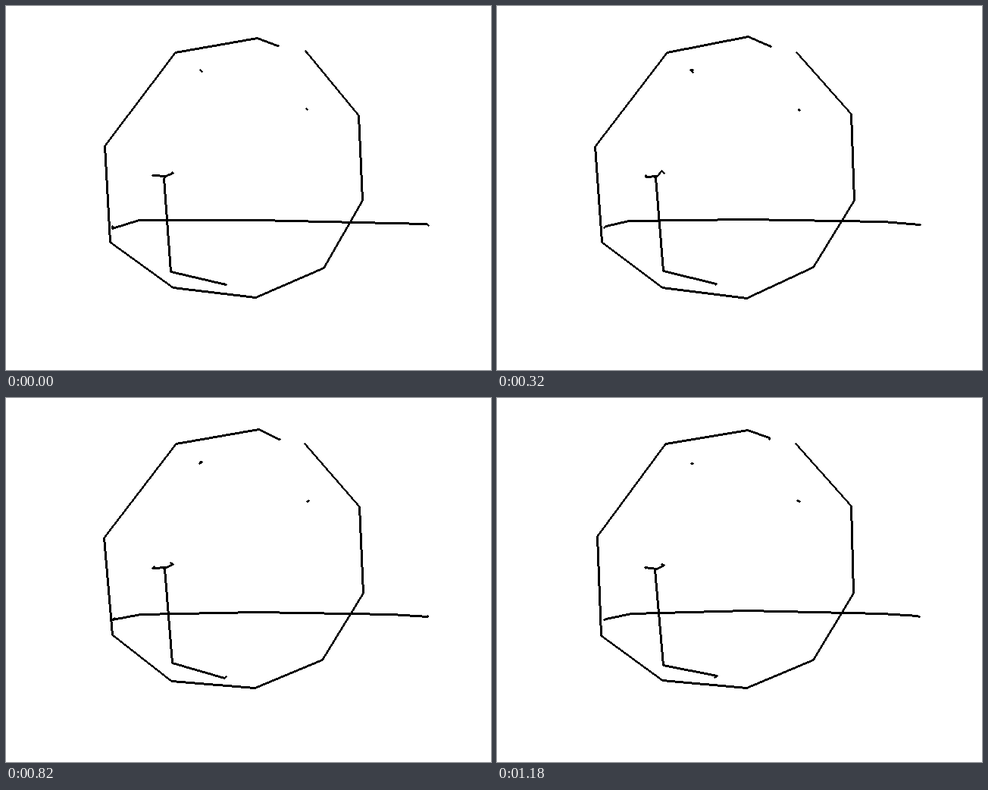
These frames come from a looping animation (640 by 480 pixels, 1200 ms). An HTML page with a canvas:

```html
<!DOCTYPE html>
<html lang="en">
<head>
<meta charset="utf-8">
<title>Wobbly face</title>
<style>
  html, body { margin: 0; width: 100%; height: 100%; overflow: hidden; background: #fff; }
  canvas { display: block; }
</style>
</head>
<body>
<canvas id="stage" width="640" height="480"></canvas>
<script>
const canvas = document.getElementById('stage');
const ctx = canvas.getContext('2d');
const STEP = 20, FRAMES = 60, SPREAD = 4;

const point = (x, y) => ({ x, y });

// Key points of the drawing, at the low end of their wobble.
const head = [
  point(358, 52), point(330, 40), point(221, 59), point(129, 182), point(137, 311),
  point(217, 370), point(327, 382), point(416, 343), point(468, 256), point(465, 141),
  point(394, 59)
];
const leftEye = [point(255, 84)];
const rightEye = [point(396, 135)];
const brow = [point(193, 222), point(209, 222), point(217, 217)];
const nose = [point(208, 225), point(217, 349), point(287, 366)];
const mouth = [point(140, 290), point(174, 282), point(329, 279), point(508, 283), point(555, 286)];

// The pen rests at both ends, which leaves a small hook there.
const withRests = stroke => [stroke[0], ...stroke, stroke[stroke.length - 1]];
const strokes = [head, leftEye, rightEye, brow, nose, mouth].map(withRests);

function seeded(seed) {
  let s = seed;
  return () => {
    s = (s + 0x6D2B79F5) | 0;
    let h = Math.imul(s ^ (s >>> 15), s | 1);
    h ^= h + Math.imul(h ^ (h >>> 7), h | 61);
    return ((h ^ (h >>> 14)) >>> 0) / 2 ** 32;
  };
}

// A round three-pixel pen without smoothing.
function dab(x, y) {
  ctx.fillRect(x - 1, y, 3, 1);
  ctx.fillRect(x, y - 1, 1, 3);
}

function drawLine(a, b) {
  const dx = b.x - a.x, dy = b.y - a.y;
  const steps = Math.max(Math.abs(dx), Math.abs(dy), 1);
  for (let i = 0; i <= steps; i++) {
    dab(Math.round(a.x + dx * i / steps), Math.round(a.y + dy * i / steps));
  }
}

function draw(frame) {
  const random = seeded(frame);
  const wobble = v => v + Math.floor(random() * SPREAD);
  ctx.fillStyle = '#fff';
  ctx.fillRect(0, 0, canvas.width, canvas.height);
  ctx.fillStyle = '#000';
  for (const stroke of strokes) {
    const shaken = stroke.map(p => point(wobble(p.x), wobble(p.y)));
    for (let i = 1; i < shaken.length; i++) drawLine(shaken[i - 1], shaken[i]);
  }
}

const start = performance.now();
function tick() {
  draw(Math.floor((performance.now() - start) / STEP) % FRAMES);
  requestAnimationFrame(tick);
}
tick();
</script>
</body>
</html>
```
